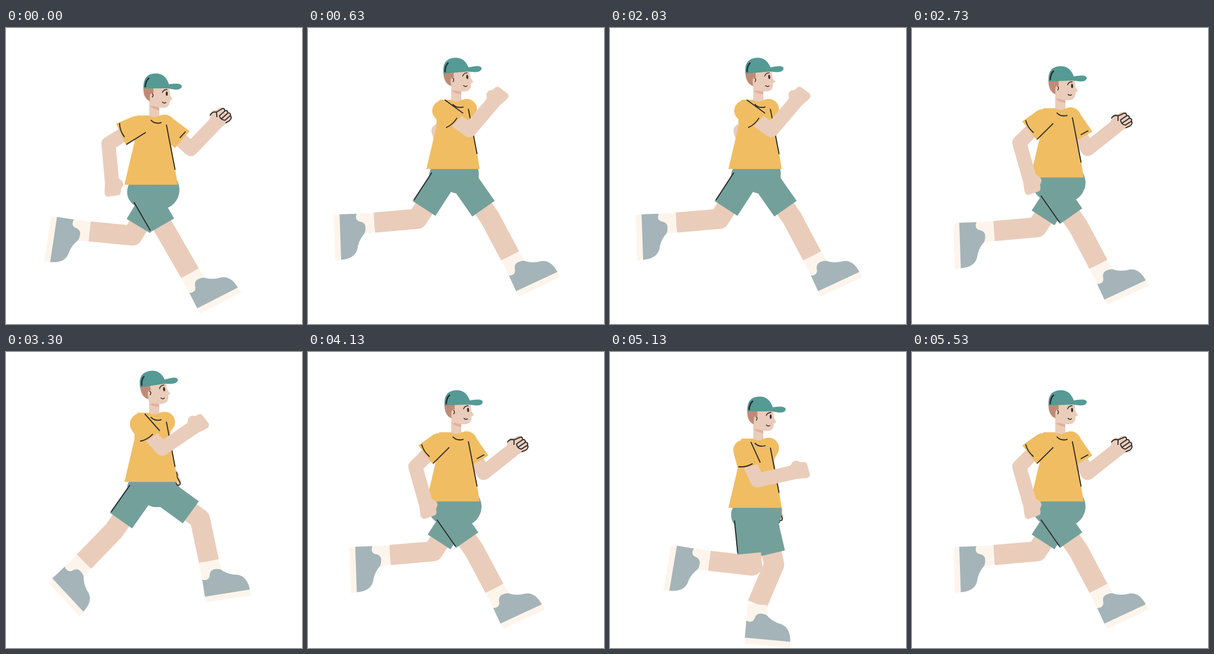
Animation, 500 px wide and 500 px high, one loop 5610 ms. Source, as an HTML page:

```html
<!DOCTYPE html>
<html lang="en">
<head>
<meta charset="utf-8">
<title>Runner</title>
<style>
  html, body { margin: 0; width: 100%; height: 100%; overflow: hidden; background: #fff; }
  svg { display: block; width: 100vw; height: 100vh; }
  .skin { fill: #eaccba; }
  .limb { fill: none; stroke: #eaccba; stroke-linejoin: round; }
  .arm { stroke-width: 24; }
  .leg { stroke-width: 34; }
  .shirt { fill: #f0bd62; }
  .shorts { fill: #74a09b; }
  .hat { fill: #559a95; }
  .hair { fill: #c08b76; }
  .shadow { fill: #e3b09c; }
  .shoe { fill: #a5b4b8; }
  .cream { fill: #fdf5ec; }
  .ink { fill: none; stroke: #2b2b2d; stroke-width: 1.8; stroke-linecap: round; stroke-linejoin: round; }
  .fine { stroke-width: 1.4; }
  .bold { stroke-width: 2.4; }
</style>
</head>
<body>
<svg viewBox="0 0 500 500">
  <defs>
    <g id="foot">
      <path class="cream" d="M-16.5 0H16.5L21 30L-16 33Z"/>
      <path class="shoe" d="M-16 29Q-7 33 -3 26Q-1 14 9 15Q17 15 21 20Q31 28 44 30Q60 35 61 59H-16Z"/>
      <path class="cream" d="M-16 58H61L62 68H-15Z"/>
    </g>
    <path id="fist" class="skin" d="M-10 56H10L14 62Q20 65 18 73L14 78Q14 88 8 88L-9 89Q-15 88 -14 80L-12 66Z"/>
  </defs>

  <g id="farArm">
    <polyline class="limb arm"/>
    <g class="hand">
      <use href="#fist"/>
      <path class="ink" d="M16 64Q18 71 12 75L6 70M12 75L9 86Q7 90 3 86L4 74M3 87Q0 91 -3 87L-2 74M-3 88Q-7 91 -9 87L-8 75M-9 87Q-14 87 -14 80L-12 73M-8 75Q-2 70 4 74"/>
    </g>
    <g class="sleeve">
      <path class="shirt" d="M-17 0A17.5 17.5 0 0 1 17 0L21 38L-17 39Z"/>
      <path class="ink" d="M2 33.5H15"/>
    </g>
  </g>

  <g id="farLeg">
    <polyline class="limb leg"/>
    <use class="foot" href="#foot"/>
    <g class="cuff">
      <circle class="shorts" cy="-4" r="33"/>
      <path class="shorts" d="M-23 0H23V67H-23Z"/>
    </g>
  </g>

  <g id="nearLeg">
    <polyline class="limb leg"/>
    <use class="foot" href="#foot"/>
    <g class="cuff">
      <circle class="shorts" r="27"/>
      <path class="shorts" d="M-23 0H23V65H-23Z"/>
      <path class="ink" d="M-22 8V62"/>
    </g>
  </g>

  <g id="torso">
    <path class="skin" d="M242 -148H259V-113Q250 -107 242 -113Z"/>
    <path class="shirt" d="M222 -117H241Q251 -111 260 -117H270Q280 -114 282 -101L277 -80L290 0H200L217 -72V-101Z"/>
    <circle class="shirt" cx="268" cy="-101" r="17.5"/>
    <path class="ink" d="M245 -109Q252 -102 262 -105M271 -101L285.5 -26"/>
    <g id="head">
      <path class="shadow" d="M243 -133H259V-126Q249 -127 243 -133Z"/>
      <path class="hair" d="M232 -165H252V-146L243 -141Q231 -146 232 -165Z"/>
      <path class="skin" d="M249 -165H276L277 -152L281 -145Q280 -143 277 -143Q277 -130 265 -130Q254 -130 243 -136V-149Q243 -156 249 -155Z"/>
      <path class="hat" d="M232 -163Q231 -188 253 -188Q269 -188 275 -170Q281 -171 290 -171Q297 -170 297 -166Q295 -160 285 -161Q278 -162 274 -163Z"/>
      <path class="ink bold" d="M235 -166Q236 -176 241 -180"/>
      <path class="ink fine" d="M264 -156Q266 -161 272 -161M264 -140Q267 -137 270 -139M247 -154Q250 -152 247 -148"/>
      <ellipse cx="271.5" cy="-154" rx="1.6" ry="3.6" fill="#2b2b2d"/>
    </g>
  </g>

  <g id="nearArm">
    <polyline class="limb arm"/>
    <g class="hand"><use href="#fist"/></g>
    <g class="sleeve">
      <path class="shirt" d="M-17 0A17.5 17.5 0 0 1 17 0L18 36L-22 31Z"/>
      <path class="ink" d="M-19 26Q-9 32 4 31M17 -3V34"/>
    </g>
  </g>
</svg>
<script>
  const LOOP = 5610, STRIDE = 700, POSES = 20;
  const UPPER_ARM = 60, FOREARM = 64, THIGH = 86, SHIN = 73;

  // A swing over the whole cycle plus a smaller one at twice the rate, each with its peak pose.
  const wave = (mean, amp, peak, amp2, peak2) => pose => {
    const turn = 2 * Math.PI / POSES;
    return mean + amp * Math.cos(turn * (pose - peak)) + amp2 * Math.cos(2 * turn * (pose - peak2));
  };

  // Periodic curve through a few [pose, value] points that never overshoots them.
  const through = points => {
    const n = points.length;
    const at = i => {
      const lap = Math.floor(i / n), [x, y] = points[i - lap * n];
      return [x + lap * POSES, y];
    };
    const rise = i => (at(i + 1)[1] - at(i)[1]) / (at(i + 1)[0] - at(i)[0]);
    const slope = i => {
      const a = rise(i - 1), b = rise(i);
      return a * b > 0 ? 2 * a * b / (a + b) : 0;
    };
    return pose => {
      const x = pose % POSES;
      let i = n - 1;
      while (points[i][0] > x) i--;
      const [x0, y0] = at(i), [x1, y1] = at(i + 1);
      const span = x1 - x0, s = (x - x0) / span, r = 1 - s;
      return r * r * ((1 + 2 * s) * y0 + s * span * slope(i))
        + s * s * ((1 + 2 * r) * y1 - r * span * slope(i + 1));
    };
  };

  // Angles are degrees from straight down, forward positive.
  const hatTop = wave(60.2, 7.5, 18, 22, 1.7);
  const nearArm = { upper: wave(0, 54, 10.3, 14, 7), fore: wave(74, 65, 10, 12, 7) };
  const farArm = { upper: wave(-6, 50, 1, 19, 2), fore: wave(74, 62, 0.5, 3, 2) };
  const thighAngle = through([[0, 30], [3, 13], [7, -35], [10, -31], [14, 20], [17, 54], [19, 35]]);
  const shinAngle = through([[0, 30], [2, -18], [5, -30], [7, -44], [9, -85], [12, -107], [17, 12], [19, 28]]);

  // The foot is square to the shin, except that it flattens while planted.
  const footAngle = pose => {
    const p = pose % POSES;
    return shinAngle(p) - 3 + (p < 5 ? 22 * Math.sin(Math.PI * p / 5) : 0);
  };

  const polar = ([x, y], angle, length) => {
    const a = angle * Math.PI / 180;
    return [x + Math.sin(a) * length, y + Math.cos(a) * length];
  };
  const byId = id => document.getElementById(id);
  const place = (el, [x, y], angle) =>
    el.setAttribute('transform', `translate(${x} ${y}) rotate(${-angle})`);

  function drawArm(root, joints, shoulder, pose) {
    const upper = joints.upper(pose), fore = joints.fore(pose);
    const elbow = polar(shoulder, upper, UPPER_ARM);
    const wrist = polar(elbow, fore, FOREARM);
    root.querySelector('.limb').setAttribute('points', [shoulder, elbow, wrist].join(' '));
    place(root.querySelector('.hand'), elbow, fore);
    place(root.querySelector('.sleeve'), shoulder, upper);
  }

  function drawLeg(root, hip, pose) {
    const thigh = thighAngle(pose);
    const knee = polar(hip, thigh, THIGH);
    const ankle = polar(knee, shinAngle(pose), SHIN);
    root.querySelector('.limb').setAttribute('points', [hip, knee, ankle].join(' '));
    place(root.querySelector('.foot'), ankle, footAngle(pose));
    place(root.querySelector('.cuff'), hip, thigh);
  }

  // Each stride holds its first pose 100 ms, then steps 15 times a second.
  function poseAt(time) {
    const t = Math.min(time % LOOP, 8 * STRIDE - 1);
    const stride = Math.floor(t / STRIDE), ms = t % STRIDE;
    const step = ms < 100 ? 0 : 1 + Math.floor((ms - 96) * 15 / 1000);
    return (stride % 2) * 10 + Math.min(step, 9);
  }

  function draw(pose) {
    const top = hatTop(pose), hem = top + 188;
    byId('torso').setAttribute('transform', `translate(0 ${hem})`);
    byId('head').setAttribute('transform', `rotate(${(top - 76) * 0.19} 251 -125)`);
    drawArm(byId('farArm'), farArm, [268, hem - 101], pose);
    drawArm(byId('nearArm'), nearArm, [224, hem - 101], pose);
    drawLeg(byId('farLeg'), [258, hem + 12], pose + 10);
    drawLeg(byId('nearLeg'), [231.5, hem + 12], pose);
  }

  const start = performance.now();
  function tick() {
    draw(poseAt(performance.now() - start));
    requestAnimationFrame(tick);
  }
  tick();
</script>
</body>
</html>
```
